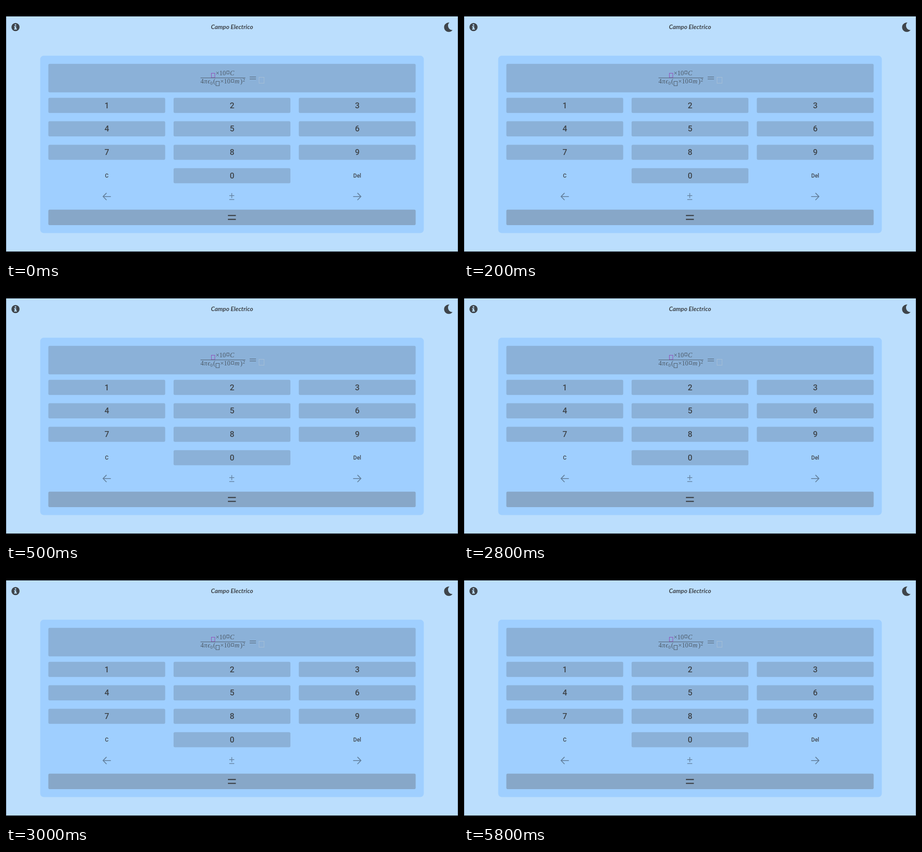
Animation of 998x561 px, one loop 5900 ms. Source, as an HTML page:

```html
<!DOCTYPE html>
<html lang="es">
<head>
<meta charset="utf-8">
<title>Campo Electrico</title>
<style>
html, body { margin: 0; width: 100%; height: 100%; overflow: hidden; background: #000; }
svg {
  display: block; width: 998px; height: 561px;
  --bg: #bbdefd; --edge: #7189a0; --panel: #9fcfff; --key: #8bb1d8; --enter: #87a7c8;
  --text: #3f454b; --math: #4b5865; --arrow: #64819f; --equals: #3f454b;
  --slot: #9347b8; --result: #a9c0d6;
}
svg.dark {
  --bg: #171b31; --edge: #10131f; --panel: #262b42; --key: #1b202e; --enter: #3a3344;
  --text: #f3f4f6; --math: #e4e6ea; --arrow: #191e2c; --equals: #22222f;
  --slot: #692b82; --result: #d5d7dc;
}
.dark #app { transform: translateY(-.8px); }
.dark #moon, svg:not(.dark) #sun { display: none; }
text { fill: var(--text); text-anchor: middle; }
.title { font: italic 700 13.6px Lato, sans-serif; }
.digit { font: 500 18px Roboto, sans-serif; }
.small { font: 500 12px Roboto, sans-serif; }
.math text { font: 14.3px "Liberation Serif", serif; fill: var(--math); text-anchor: start; }
.math .it { font-style: italic; }
.math .sub { font-size: 10px; }
.math path, .math rect { fill: none; stroke: var(--math); }
.line { fill: none; stroke: var(--arrow); stroke-width: 1.8; }
.icon { fill: var(--text); }
</style>
</head>
<body>
<svg id="stage" viewBox="0 0 998 561">
  <rect width="998" height="561"/>
  <rect y="23" width="998" height="519.5" fill="var(--edge)"/>
  <rect x="1" y="23" width="996" height="519" fill="var(--bg)"/>
  <rect x="75.5" y="109.7" width="847" height="391.8" rx="8" fill="var(--panel)"/>
  <g id="app">
    <circle class="icon" cx="21" cy="46.6" r="9"/>
    <path d="M19.3 40.5h3.2v2.8h-3.2zM18 44.8h4.5v5h1.4v2.2H18v-2.2h1.4V47H18z" fill="var(--bg)"/>
    <text class="title" x="499" y="50.5">Campo Electrico</text>
    <path id="moon" class="icon" d="M979 36.6A10.4 10.4 0 1 0 986 53A9.5 9.5 0 0 1 979 36.6"/>
    <g id="sun">
      <polygon class="icon"/>
      <circle cx="977" cy="46.7" r="4.7" fill="none" stroke="var(--bg)" stroke-width="1.5"/>
    </g>
    <rect x="93.5" y="127.8" width="811" height="63" rx="3" fill="var(--key)"/>
    <g class="math">
      <rect x="453.5" y="148.5" width="7.5" height="9.5" style="stroke:var(--slot)"/>
      <text x="463" y="153">×10</text>
      <rect x="487.5" y="143.5" width="5" height="6.5"/>
      <text class="it" x="494.5" y="153">C</text>
      <path d="M429.5 158.8h99"/>
      <text x="429.5" y="171.3">4</text>
      <text class="it" x="437" y="171.3">π</text>
      <text class="it" x="445.3" y="171.3">ϵ</text>
      <text class="sub" x="451.3" y="173.5">0</text>
      <text x="457.5" y="171.3">(</text>
      <rect x="463.5" y="166.5" width="7.5" height="9.5"/>
      <text x="473" y="171.3">×10</text>
      <rect x="497.5" y="162.5" width="5.5" height="6"/>
      <text class="it" x="505" y="171.3">m</text>
      <text x="517.3" y="171.3">)</text>
      <text class="sub" x="522.8" y="167">2</text>
      <path d="M538 156.8h14m-14 4.4h14"/>
      <rect x="558.8" y="157.5" width="11" height="13" style="stroke:var(--result)"/>
    </g>
    <g id="keys"></g>
    <text class="small" x="222.5" y="378.8">C</text>
    <text class="small" x="775.5" y="378.8">Del</text>
    <path class="line" d="M231.5 420.8H214.500M222 413l-7.700 7.800 7.700 7.800"/>
    <path class="line" d="M766.500 420.800H783.500M776 413l7.700 7.800-7.700 7.800"/>
    <path class="line" style="stroke-width:1.5" d="M493 418.800h11M498.500 413.300v11M493 427.500h11"/>
    <rect x="93.500" y="449.800" width="811" height="34.200" rx="3" fill="var(--enter)"/>
    <path d="M490 462.700h17.500M490 471.200h17.500" stroke="var(--equals)" stroke-width="2.600"/>
  </g>
</svg>
<script>
const LOOP = 5900, DARK_START = 2000, DARK_END = 2800;
const stage = document.getElementById('stage');

const key = (label, col, row) => {
  const x = 93.5 + col * 276.5, y = 202.8 + row * 51.8;
  return `<rect x="${x}" y="${y}" width="258" height="33.4" rx="3" fill="var(--key)"/>
    <text class="digit" x="${x + 129}" y="${y + 22.7}">${label}</text>`;
};
document.getElementById('keys').innerHTML =
  [1, 2, 3, 4, 5, 6, 7, 8, 9].map((n, i) => key(n, i % 3, Math.floor(i / 3))).join('') + key(0, 1, 3);

const rays = Array.from({ length: 16 }, (_, i) => {
  const a = i * Math.PI / 8, r = i % 2 ? 7.5 : 9.8;
  return [977 + r * Math.cos(a), 46.7 + r * Math.sin(a)];
});
document.querySelector('#sun polygon').setAttribute('points', rays.join(' '));

const start = performance.now();
function tick() {
  const t = (performance.now() - start) % LOOP;
  stage.classList.toggle('dark', t >= DARK_START && t < DARK_END);
  requestAnimationFrame(tick);
}
tick();
</script>
</body>
</html>
```
